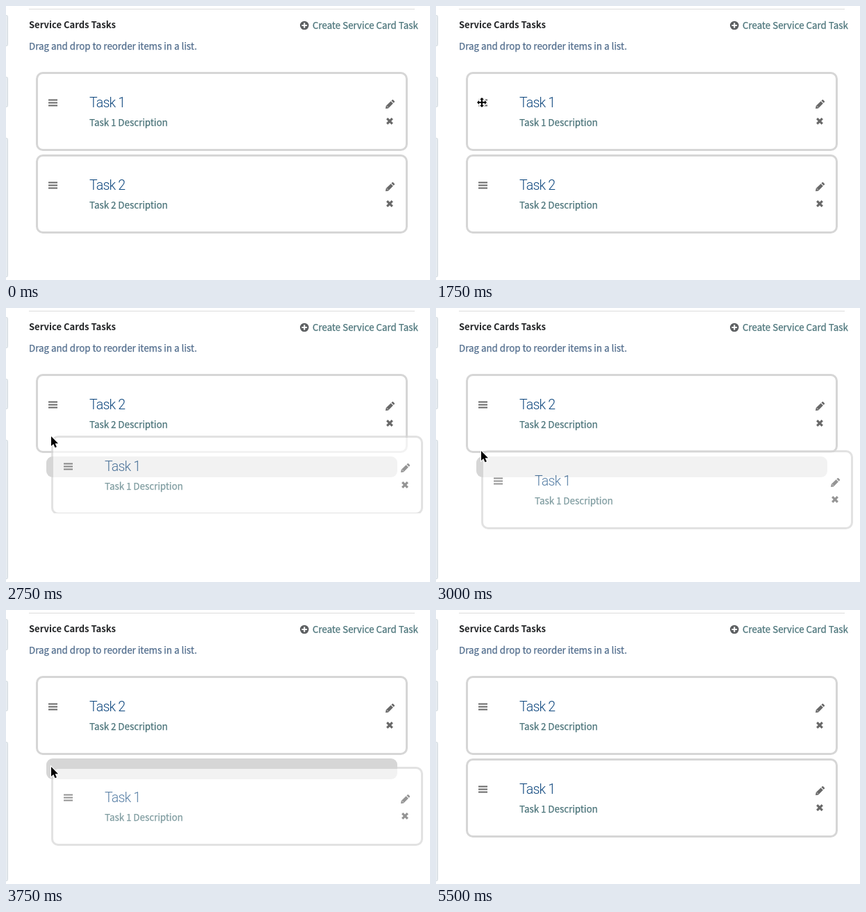
Animation of 610 by 395 pixels, one loop 7 s. Source, as an HTML page:

```html
<!DOCTYPE html>
<html lang="en">
<head>
<meta charset="utf-8">
<title>Reorder tasks</title>
<style>
  html, body { margin: 0; width: 100%; height: 100%; overflow: hidden; background: #fff; }
  svg { display: block; }
  text {
    font: 13.33px "Noto Sans CJK JP", "Noto Sans CJK SC", "Noto Sans CJK", "Open Sans", sans-serif;
    fill: var(--ink); stroke: var(--ink); stroke-width: .25px;
  }
  .heading { --ink: #222426; font-size: 13px; font-weight: 700; stroke: none; }
  .hint { --ink: #506c8c; }
  .link { --ink: #4a7379; }
  .title { --ink: #124a80; font: 300 19.5px Roboto, "Liberation Sans", sans-serif; letter-spacing: -.8px; stroke: none; }
  .icon { fill: #686868; }
  .slot { fill: #d6d6d6; }
  .side { fill: #e6ebf0; stroke: #d3d9df; }
</style>
</head>
<body>
<svg width="610" height="395" viewBox="0 0 610 395">
  <defs>
    <clipPath id="ghostClip"><rect id="clipRect" width="610" height="395"/></clipPath>
    <g id="cardBase">
      <rect x="1.5" y="1.5" width="532" height="111" rx="8.5" fill="#fff" stroke="#d6d6d6" stroke-width="3"/>
      <path class="icon" d="M18 39.5h13v2H18zM18 43.5h13v2H18zM18 47.5h13v2H18z"/>
      <path class="icon" d="M503 53l.7-3.9 6.9-6.9 3.3 3.3-6.9 6.9zM511.4 41.4l1.3-1.2q.7-.5 1.3.1l1.9 1.9q.6.7 0 1.4l-1.2 1.2z"/>
      <path d="M505 49.3l1.9 1.9" stroke="#fff" stroke-width=".8"/>
      <path d="M505.2 67.2l7.6 7.6M512.8 67.2l-7.6 7.6" stroke="#686868" stroke-width="3.2"/>
    </g>
  </defs>

  <rect class="side" x="-9.5" y="13.5" width="12" height="44" rx="2"/>
  <rect class="side" x="-9.5" y="102.5" width="12" height="43" rx="2"/>
  <rect class="side" x="-9.5" y="190.5" width="12" height="200" rx="2"/>
  <path d="M33 4.5H588" stroke="#dcdcdc"/>
  <text class="heading" x="33" y="32">Service Cards Tasks</text>
  <text class="hint" x="33" y="63">Drag and drop to reorder items in a list.</text>
  <circle cx="429.3" cy="28" r="6.3" fill="#5c5f61"/>
  <path d="M425.5 28h7.6M429.3 24.2v7.6" stroke="#fff" stroke-width="2"/>
  <text class="link" x="441" y="33">Create Service Card Task</text>

  <rect id="slot" class="slot" x="58" width="505" height="30" rx="9"/>
  <g id="task2"></g>
  <g clip-path="url(#ghostClip)"><g id="task1"></g></g>

  <path id="arrow" d="M0 0V14L3.2 11 5.5 16.2 7.9 15.2 5.6 10.2H10Z" stroke="#fff" stroke-width="2" paint-order="stroke"/>
  <path id="move" transform="translate(66 139)" stroke="#fff" stroke-width="2.4" paint-order="stroke"
    d="M0-7L3-4H1V-1H4V-3L7 0 4 3V1H1V4H3L0 7-3 4H-1V1H-4V3L-7 0-4-3V-1H-1V-4H-3Z"/>
</svg>
<script>
const LOOP = 7000, TOP = 95, BOTTOM = 214, LEFT = 43, GHOST_LEFT = 65;
const $ = id => document.getElementById(id);

for (const n of [1, 2]) {
  $('task' + n).innerHTML = `<use href="#cardBase"/>
    <text class="title" x="77" y="50.5">Task ${n}</text>
    <text class="link" x="77" y="78">Task ${n} Description</text>`;
}

const before = { task1: TOP, task2: BOTTOM };
const after = { task1: BOTTOM, task2: TOP };
const drag = (y, pointerY, extra) =>
  ({ task1: y, task2: TOP, slot: BOTTOM, alpha: .7, pointer: [65, pointerY], ...extra });

const steps = [
  [0, before],
  [500, { ...before, pointer: [217, 41] }],
  [1000, { ...before, pointer: [121, 93.5] }],
  [1250, { ...before, pointer: [84, 126.5] }],
  [1750, { ...before, move: true }],
  [2500, drag(148, 147.5, { task2: 125, slot: 90, alpha: .22 })],
  [2750, drag(184, 185, { clip: 296 })],
  [3000, drag(205, 206)],
  [3250, drag(227, 227)],
  [3750, drag(226, 226)],
  [4000, { ...after, pointer: [65, 224] }],
  [5500, after],
];

const place = (id, x, y) => $(id).setAttribute('transform', `translate(${x} ${y})`);
const show = (id, on) => $(id).setAttribute('visibility', on ? 'visible' : 'hidden');

function draw(time) {
  const t = time % LOOP;
  const s = steps.findLast(([start]) => start <= t)[1];
  place('task1', s.alpha ? GHOST_LEFT : LEFT, s.task1);
  place('task2', LEFT, s.task2);
  $('task1').setAttribute('opacity', s.alpha ?? 1);
  $('clipRect').setAttribute('height', s.clip ?? 395);
  $('slot').setAttribute('y', s.slot ?? 0);
  show('slot', s.slot);
  show('arrow', s.pointer);
  show('move', s.move);
  if (s.pointer) place('arrow', ...s.pointer);
}

const begin = performance.now();
(function tick() {
  draw(performance.now() - begin);
  requestAnimationFrame(tick);
})();
</script>
</body>
</html>
```
